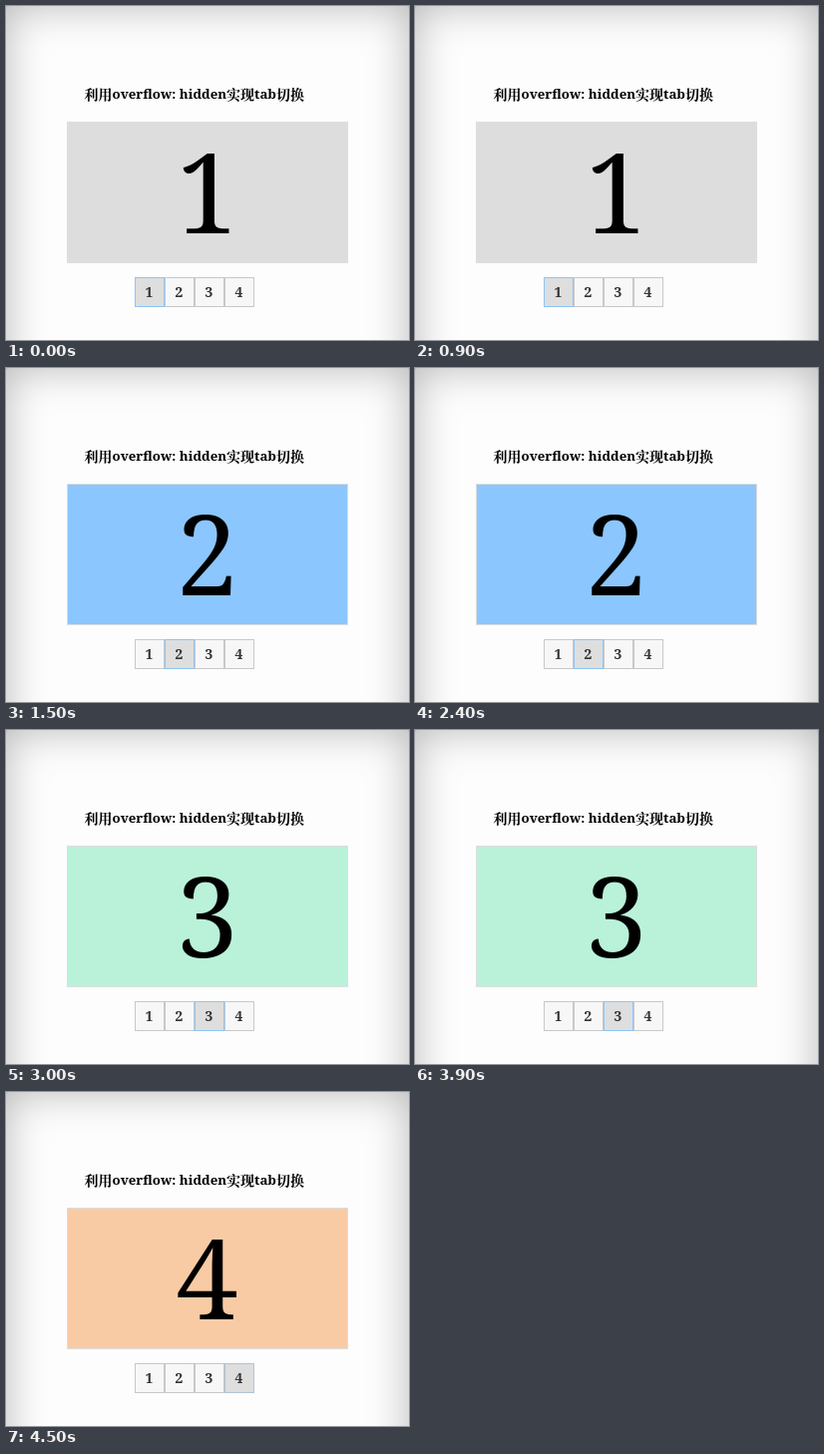
Recreate the animation shown at these times as an HTML page with a canvas. Size 404 by 335 pixels, loop 6000 ms.

```html
<!DOCTYPE html>
<html lang="zh">
<head>
<meta charset="utf-8">
<title>Tab switch</title>
<style>
html, body { margin: 0; width: 100%; height: 100%; overflow: hidden; background: #fdfdfd; }
#page { position: fixed; left: 0; top: 0; width: 404px; height: 435px; border-radius: 4px;
  background: #fdfdfd; box-shadow: inset 0 0 42px rgba(0, 0, 0, .28), 0 0 0 9px #b4bcc8; }
canvas { position: fixed; left: 0; top: 0; display: block; }
</style>
</head>
<body>
<div id="page"></div>
<canvas id="stage" width="404" height="335"></canvas>
<script>
const ctx = document.getElementById('stage').getContext('2d');
const HOLD = 1500;
const SERIF = '"Noto Serif", serif';
const HAN = '"Noto Serif CJK SC", "Noto Sans CJK SC", sans-serif';
const BLUE = '#8ec5f6';

// panel fill and active tab outline
const tabs = [
  { fill: '#dddddd', line: BLUE },
  { fill: '#8bc6fe', line: BLUE },
  { fill: '#b9f2d9', line: BLUE },
  { fill: '#f9cba5', line: '#b0c3d4' }
];

function box(x, y, w, h, fill, line) {
  ctx.fillStyle = line;
  ctx.fillRect(x, y, w, h);
  ctx.fillStyle = fill;
  ctx.fillRect(x + 1, y + 1, w - 2, h - 2);
}

function text(str, x, y, font, align, color) {
  ctx.font = font;
  ctx.textAlign = align;
  ctx.fillStyle = color;
  ctx.fillText(str, x, y);
}

function title() {
  const han = 'bold 14px ' + HAN;
  const latin = 'bold 13.3px ' + SERIF;
  text('利用', 78.5, 93.5, han, 'left', '#000');
  text('overflow: hidden', 106.5, 93, latin, 'left', '#000');
  text('实现', 221, 93.5, han, 'left', '#000');
  text('tab', 249, 93, latin, 'left', '#000');
  text('切换', 271, 93.5, han, 'left', '#000');
}

function button(i, on) {
  const x = 129 + i * 30;
  box(x, 272, 30, 30, on ? '#dedede' : '#f7f7f7', on ? tabs[i].line : '#c8c8c8');
  text(i + 1, x + 14.5, 292, 'bold 14px ' + SERIF, 'center', '#333');
}

function draw(now) {
  const active = Math.floor(now / HOLD) % tabs.length;
  ctx.clearRect(0, 0, 404, 335);
  title();
  box(61, 116, 282, 142, tabs[active].fill, '#dddddd');
  text(active + 1, 201.5, 228, '500 111px ' + SERIF, 'center', '#000');
  tabs.forEach((t, i) => button(i, i === active));
}

const start = performance.now();
function loop() {
  draw(performance.now() - start);
  requestAnimationFrame(loop);
}
loop();
</script>
</body>
</html>
```
